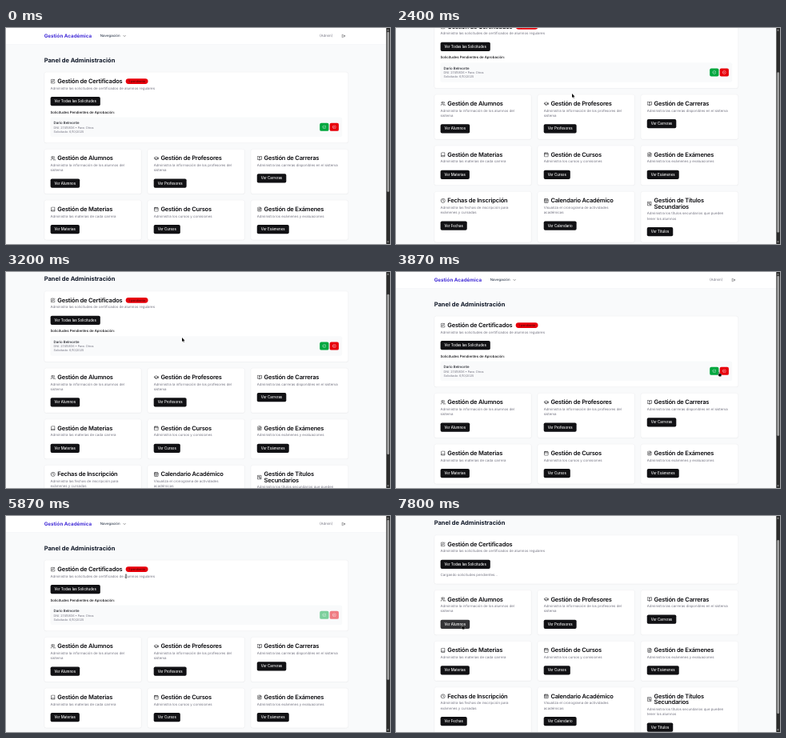
Animation, 480 px wide and 270 px high, one loop 8 s. Source, as an HTML page:

```html
<!DOCTYPE html>
<html lang="es">
<head>
<meta charset="utf-8">
<title>Panel de Administración</title>
<style>
* { box-sizing: border-box; margin: 0; }
html, body { width: 480px; height: 270px; overflow: hidden; }
body { position: relative; background: #f9fafb; color: #0c0c10; font: 14px/20px Inter, sans-serif; text-rendering: geometricPrecision; }
/* The page is laid out at 1536 x 864 and shown at 480 x 270. */
#view { position: absolute; width: 1536px; height: 864px; overflow: hidden; transform: scale(.3125); transform-origin: 0 0; }
#page { position: absolute; width: 1521px; }
svg { flex: none; fill: none; stroke: currentColor; stroke-width: 2; stroke-linecap: round; stroke-linejoin: round; }
header { position: relative; height: 65px; background: #fff; border-bottom: 1px solid #e9eaee; }
header > * { position: absolute; top: 22px; }
.brand { left: 152.5px; font: 700 20px/20px Inter, sans-serif; color: #432dd7; }
.nav { left: 377px; font-weight: 500; color: #364153; }
.muted, .desc { color: #737380; }
main { width: 1280px; margin: 0 auto; padding: 47px 32px 48px; }
h1 { font-size: 24px; line-height: 32px; margin-bottom: 32px; color: #101828; }
.grid { display: grid; grid-template-columns: repeat(3, 1fr); gap: 24px; margin-top: 24px; }
.card { padding: 24px; background: #fff; border: 1px solid #ebebee; border-radius: 8px; box-shadow: 0 1px 3px #0001; }
.head { display: flex; align-items: center; gap: 8px; }
h2 { font: 600 24px/24px Inter, sans-serif; letter-spacing: -.025em; white-space: pre; }
.desc { width: fit-content; white-space: pre; margin: 6px 0 24px; }
button { display: block; height: 36px; padding: 0 16px; border: 0; border-radius: 6px; background: #111114; color: #fafafa; font: 500 14px/20px Inter, sans-serif; }
button.hover { background: #333336; }
.badge { margin: -1px 0 -1px 6px; padding: 3px 11px; border-radius: 11px; background: #e7000b; color: #6c0808; font: 600 12px/16px Inter, sans-serif; }
h3 { width: fit-content; margin: 16px 0 10px; font: 500 14px/20px Inter, sans-serif; }
.item { display: flex; gap: 4px; align-items: center; padding: 12px; border: 1px solid #f6f7f8; border-radius: 6px; background: #f9fafb; }
.item div { flex: 1; font-size: 12px; line-height: 16px; }
.item b { display: block; font: 500 14px/20px Inter, sans-serif; color: #1e2028; }
.item button { width: 36px; height: 32px; padding: 8px 10px; line-height: 0; }
.item .ok { background: #00a63e; }
.item .no { background: #e7000b; }
.busy .item button { opacity: .5; }
.wait { display: none; margin-top: 16px; }
.loading .wait { display: block; }
.loading .badge, .loading h3, .loading .item { display: none; }
#bar { position: absolute; right: 0; width: 15px; height: 864px; background: #2c2c2c; }
#bar i { position: absolute; left: 3px; width: 9px; border-radius: 5px; background: #9f9f9f; }
#bar::before, #bar::after { content: ""; position: absolute; left: 3px; border: solid transparent; border-width: 0 4.5px; }
#bar::before { top: 5px; border-bottom: 6px solid #9f9f9f; }
#bar::after { bottom: 5px; border-top: 6px solid #9f9f9f; }
#cursor { position: absolute; left: 0; top: 0; overflow: visible; pointer-events: none; fill: #0c0c0c; stroke: #fff; stroke-width: .5; paint-order: stroke; }
</style>
</head>
<body>
<div id="view">
  <div id="page"></div>
  <div id="bar"><i></i></div>
</div>
<svg id="cursor" width="5" height="7"><path/></svg>
<script>
const calendar = 'M8 2v4M16 2v4M5 4h14a2 2 0 0 1 2 2v14a2 2 0 0 1-2 2H5a2 2 0 0 1-2-2V6a2 2 0 0 1 2-2zM3 10h18';
const sheet = 'M15 2H6a2 2 0 0 0-2 2v16a2 2 0 0 0 2 2h12a2 2 0 0 0 2-2V7zM14 2v6h6';
const disc = 'M2 12a10 10 0 1 0 20 0a10 10 0 1 0-20 0';
const icons = {
  edit: 'M12 3H5a2 2 0 0 0-2 2v15a2 2 0 0 0 2 2h13a2 2 0 0 0 2-2v-6M18 3l3 3-9 9-4 1 1-4z',
  users: 'M2 21v-2a4 4 0 0 1 4-4h6a4 4 0 0 1 4 4v2M5 7a4 4 0 1 0 8 0a4 4 0 1 0-8 0M22 21v-2a4 4 0 0 0-3-3.9M16 3.1a4 4 0 0 1 0 7.8',
  cap: 'M2 10l10-5 10 5-10 5zM22 10v6M6 12.5V17c3 3 9 3 12 0v-4.5',
  open: 'M12 7v14M12 7a4 4 0 0 0-4-4H2v15h7a3 3 0 0 1 3 3a3 3 0 0 1 3-3h7V3h-6a4 4 0 0 0-4 4',
  book: 'M4 19.5v-15A2.5 2.5 0 0 1 6.5 2H20v20H6.5a2.5 2.5 0 0 1 0-5H20',
  calendar,
  days: calendar + 'M8 14h.01M12 14h.01M16 14h.01M8 18h.01M12 18h.01M16 18h.01',
  text: sheet + 'M8 9h2M8 13h8M8 17h8',
  clock: disc + 'M12 6v6l4 2',
  award: 'M4 3h16v18H4zM8 8h5M8 12h3M13 15a2 2 0 1 0 4 0a2 2 0 1 0-4 0',
  check: disc + 'M8 12l3 3 5-6',
  cross: disc + 'M9 9l6 6M15 9l-6 6',
  down: 'M6 9l6 6 6-6',
  exit: 'M9 3H5a2 2 0 0 0-2 2v14a2 2 0 0 0 2 2h4M16 17l5-5-5-5M21 12H9'
};
const icon = (name, size = 20, attrs = '') =>
  `<svg viewBox="0 0 24 24" width="${size}" height="${size}" ${attrs}><path d="${icons[name]}"/></svg>`;
const card = ([name, title, desc, action], badge = '', more = '') => `<section class="card">
  <div class="head">${icon(name)}<h2>${title}</h2>${badge}</div>
  <p class="desc">${desc}</p><button>Ver ${action}</button>${more}</section>`;

const sections = [
  ['users', 'Gestión de Alumnos', 'Administra la información de los alumnos del\nsistema', 'Alumnos'],
  ['cap', 'Gestión de Profesores', 'Administra la información de los profesores del\nsistema', 'Profesores'],
  ['open', 'Gestión de Carreras', 'Administra las carreras disponibles en el sistema', 'Carreras'],
  ['book', 'Gestión de Materias', 'Administra las materias de cada carrera', 'Materias'],
  ['calendar', 'Gestión de Cursos', 'Administra los cursos y comisiones', 'Cursos'],
  ['text', 'Gestión de Exámenes', 'Administra los exámenes y evaluaciones', 'Exámenes'],
  ['clock', 'Fechas de Inscripción', 'Administra las fechas de inscripción para\nexámenes y cursadas', 'Fechas'],
  ['days', 'Calendario Académico', 'Visualiza el cronograma de actividades\nacadémicas', 'Calendario'],
  ['award', 'Gestión de Títulos\nSecundarios', 'Administra los títulos secundarios que pueden\ntener los alumnos', 'Títulos']
];
const pending = `<h3>Solicitudes Pendientes de Aprobación:</h3>
  <div class="item"><div class="muted"><b>Darío Belmonte</b>DNI: 27415836 • Para: Otros<br>Solicitado: 6/10/2025</div>
  <button class="ok">${icon('check', 16)}</button><button class="no">${icon('cross', 16)}</button></div>
  <p class="wait muted">Cargando solicitudes pendientes...</p>`;

const page = document.getElementById('page');
const thumb = document.querySelector('#bar i');
const cursor = document.getElementById('cursor');
page.innerHTML = `<header><span class="brand">Gestión Académica</span><span class="nav">Navegación</span>
  ${icon('down', 16, 'style="left:466px;top:24px"')}<span class="muted" style="left:1254px">(Admin)</span>
  ${icon('exit', 16, 'style="left:1342px;top:24px"')}</header>
  <main><h1>Panel de Administración</h1>` +
  card(['edit', 'Gestión de Certificados', 'Administra las solicitudes de certificados de alumnos regulares', 'Todas las Solicitudes'],
    '<span class="badge">1 pendiente</span>', pending) +
  `<div class="grid">${sections.map(s => card(s)).join('')}</div></main>`;

const shapes = {
  arrow: 'M0 0V5L1.2 4L2 5.8L2.8 5.4L2 3.7H3.6Z',
  hand: 'M-.4 0Q0-.5.4 0V2L2.6 2.6Q3 2.8 2.9 3.4L2.5 5.4H0L-1.5 3.2Q-1.2 2.7-.4 3.3Z',
  beam: 'M-.9-2.5H.9V-2H.35V2H.9V2.5H-.9V2H-.35V-2H-.9Z'
};
// Keys: time, then values
const pointer = [
  [70, 474, 170], [870, 422.3, 124.5], [1730, 422.3, 124.5], [2100, 220, 82],
  [3480, 220, 82], [3860, 403.9, 125], [4270, 400, 124], [4870, 400, 124], [5730, 157, 74],
  [5870, 150, 75.3], [6070, 150, 75.3], [6870, 112, 112], [7800, 83, 136]
];
const scroll = [
  [2100, 0], [2500, 258], [2550, 258], [2858, 100], [3480, 100], [3650, 0], [6450, 0], [6650, 100]
];
function at(keys, t) {
  const i = keys.findIndex(k => k[0] > t);
  if (i < 1) return (i ? keys[keys.length - 1] : keys[0]).slice(1);
  const a = keys[i - 1], b = keys[i];
  const u = (t - a[0]) / (b[0] - a[0]), e = u * u * (3 - 2 * u);
  return a.slice(1).map((v, j) => v + (b[j + 1] - v) * e);
}

function draw(now) {
  const t = now % 8000;
  page.className = t >= 6070 ? 'loading' : t >= 4400 ? 'busy' : '';
  const [y] = at(scroll, t), total = page.offsetHeight;
  page.style.transform = `translateY(${-y}px)`;
  thumb.style.top = 15 + 834 * y / total + 'px';
  thumb.style.height = 834 * 864 / total + 'px';

  const [cx, cy] = at(pointer, t);
  const under = document.elementFromPoint(cx, cy);
  const button = under && under.closest('button');
  page.querySelectorAll('.hover').forEach(b => b.classList.remove('hover'));
  if (button) button.classList.add('hover');
  const kind = button ? 'hand' : under && under.matches('h1, h2, h3, .desc') ? 'beam' : 'arrow';
  cursor.firstChild.setAttribute('d', shapes[kind]);
  cursor.style.transform = `translate(${cx}px, ${cy}px)`;
  cursor.style.display = t < 70 ? 'none' : '';
  requestAnimationFrame(draw);
}
draw(0);
</script>
</body>
</html>
```
